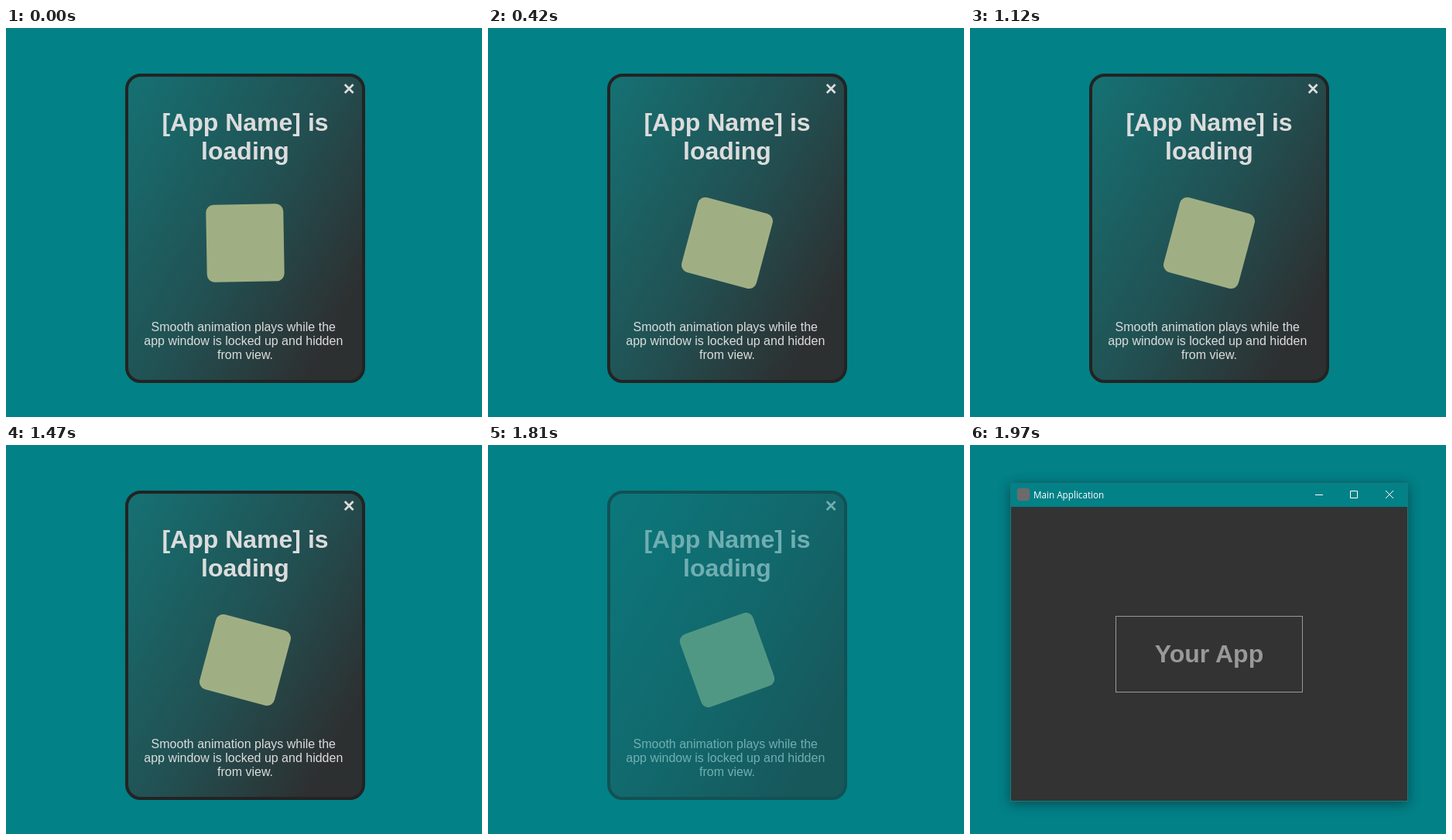
Recreate the animation shown at these times as an HTML page. Size 615 by 503 pixels, loop 5.97 s.

```html
<!DOCTYPE html>
<html lang="en">
<head>
<meta charset="utf-8">
<title>Loading screen</title>
<style>
  html, body { margin: 0; width: 100%; height: 100%; overflow: hidden; background: #028187; }
  svg { display: block; font-family: Arial, "Liberation Sans", sans-serif; }
  .panel { fill: url(#shade); stroke: #232323; stroke-width: 4; }
  .heading { font-size: 32px; font-weight: bold; fill: #dcdcdc; text-anchor: middle; }
  .note { font-size: 16px; fill: #dcdcdc; text-anchor: middle; }
  .cross { stroke: #dcdcdc; stroke-width: 2.7; }
  .frame { fill: #028187; stroke: #20777a; filter: drop-shadow(0 3px 8px rgba(0, 0, 0, .4)); }
  .caption { font: 11.7px "Open Sans", "Noto Sans", sans-serif; fill: #fff; }
  .controls { fill: none; stroke: #fff; }
  .outline { fill: none; stroke: #999; }
</style>
</head>
<body>
<svg width="615" height="503" viewBox="0 0 615 503">
  <defs>
    <!-- 120 degree gradient across the panel -->
    <linearGradient id="shade" gradientUnits="userSpaceOnUse" x1="111" y1="145" x2="507" y2="373">
      <stop offset="0" stop-color="#157173"/>
      <stop offset=".5" stop-color="#225052"/>
      <stop offset=".86" stop-color="#2d3031"/>
    </linearGradient>
  </defs>

  <g id="splash">
    <rect class="panel" x="156" y="61" width="306" height="396" rx="18"/>
    <path class="cross" d="M437.8 73l10.8 11m0-11l-10.8 11"/>
    <text class="heading"><tspan x="309" y="133">[App Name] is</tspan><tspan x="309" y="170">loading</tspan></text>
    <rect id="spinner" x="-50" y="-50" width="100" height="100" rx="10" fill="#a0af83"/>
    <text class="note">
      <tspan x="309" y="392">Smooth animation plays while the</tspan>
      <tspan x="309" y="410">app window is locked up and hidden</tspan>
      <tspan x="309" y="428">from view.</tspan>
    </text>
  </g>

  <g id="app">
    <rect class="frame" x="52.5" y="49.5" width="513" height="411"/>
    <rect x="53" y="80" width="512" height="380" fill="#333"/>
    <rect x="61" y="56" width="16" height="16" rx="3" fill="#6e6a6c"/>
    <text class="caption" x="82" y="69">Main Application</text>
    <path class="controls" d="M446 64.5h10M491.5 59.5h9v9h-9zM537 59l10 10m0-10l-10 10"/>
    <rect class="outline" x="188.5" y="221.5" width="241" height="98"/>
    <text class="heading" x="309" y="281" style="fill:#999">Your App</text>
  </g>
</svg>
<script>
  const LOOP = 5970, STEP = 70, SPIN_END = 1680;
  const POSES = [-1, 15, 33, 52, 70.3]; // one quarter turn, held per step
  const [splash, spinner, app] = ["splash", "spinner", "app"].map(id => document.getElementById(id));

  function opacities(t) {
    if (t < 1810) return [1, 0];
    if (t < 1890) return [0.5, 0];
    if (t < 1970) return [0.1, 0.6];
    return [0, 1];
  }

  function draw(t) {
    const step = Math.floor(Math.min(t, SPIN_END) / STEP);
    spinner.setAttribute("transform", `translate(309 278) rotate(${POSES[step % POSES.length]})`);
    [splash.style.opacity, app.style.opacity] = opacities(t);
  }

  const start = performance.now();
  function tick() {
    draw((performance.now() - start) % LOOP);
    requestAnimationFrame(tick);
  }
  tick();
</script>
</body>
</html>
```
